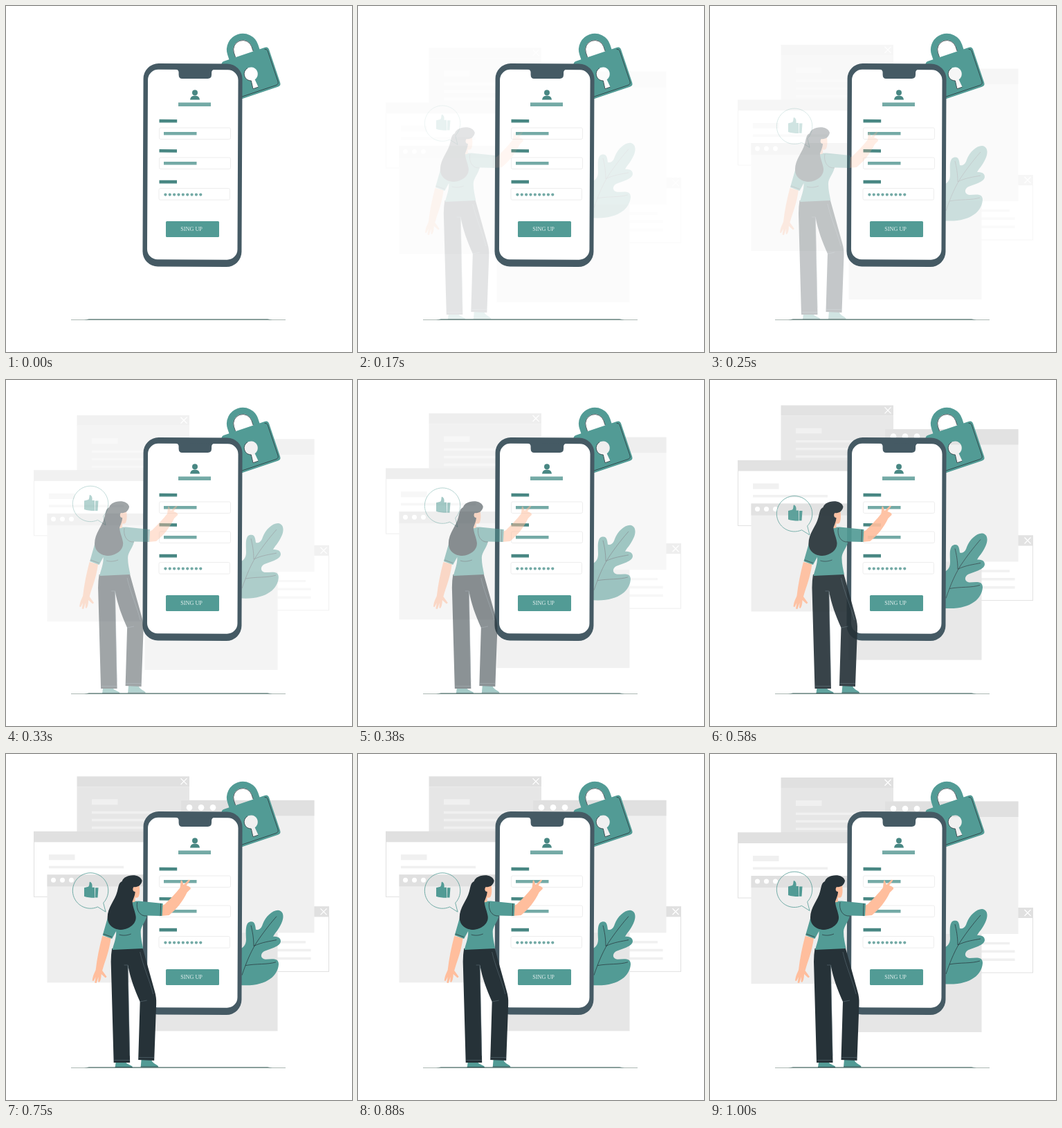
Write an HTML page that moves like this. It is 500 px wide and 500 px high and loops after 1.04 s.

```html
<!DOCTYPE html>
<html lang="en">
<head>
<meta charset="utf-8">
<title>Sign-up illustration</title>
<style>
  html, body { margin: 0; width: 100%; height: 100%; overflow: hidden; background: #fff; }
  svg { display: block; width: 100%; height: 100%; }
  .teal { fill: #529b95; }
  .deep { fill: #488783; }
  .soft { fill: #74aaa6; }
  .dark { fill: #263238; }
  .skin { fill: #ffbe9d; }
  .bar { fill: #e0e0e0; }
  .pale { fill: #f0f0f0; }
  .white { fill: #fff; }
  .frame { fill: #fff; stroke: #e0e0e0; }
  .cross { fill: none; stroke: #fff; stroke-width: 1.3; }
  .line { fill: none; stroke: #263238; stroke-width: .7; }
  .stitch { fill: none; stroke: #5b6d76; stroke-width: .6; }
  .field { fill: #fff; stroke: #ebebeb; stroke-width: .9; }
</style>
</head>
<body>
<svg viewBox="0 0 500 500">
  <g id="windows">
    <rect class="bar" x="102.5" y="34" width="162.5" height="15"/>
    <rect x="102.5" y="49" width="162.5" height="90" fill="#e6e6e6"/>
    <path class="cross" d="M252.5 36.8l9 9m0-9l-9 9"/>
    <path class="pale" d="M124 67h37.500v8H124zM124 84.500h116v3.500H124zM124 95.500h116v3.500H124zM124 106.500h116v3.500H124z"/>

    <rect class="frame" x="340" y="222.500" width="126.500" height="93.500"/>
    <rect class="bar" x="340" y="222" width="127" height="15"/>
    <path class="cross" d="M454.500 225l9 9m0-9l-9 9"/>
    <path class="pale" d="M380 272h53v3.200h-53zM380 283.500h60.500v3.500H380zM380 295.500h60.500v3.500H380z"/>

    <rect x="200.500" y="210" width="192" height="192" fill="#e6e6e6"/>
    <rect class="pale" x="253" y="68.500" width="192.500" height="191.500"/>
    <rect class="bar" x="253" y="68.500" width="192.500" height="22.500"/>
    <g class="white"><circle cx="265" cy="79" r="4.300"/><circle cx="282" cy="79" r="4.300"/><circle cx="299" cy="79" r="4.300"/></g>

    <rect class="frame" x="40.500" y="114" width="165" height="94"/>
    <rect class="bar" x="40" y="113.500" width="166" height="15.500"/>
    <path class="pale" d="M62 147h37.500v8H62zM62 163.500h108v3.500H62z"/>

    <rect x="59.500" y="176" width="150" height="156" fill="#eee"/>
    <rect class="bar" x="59.500" y="176" width="150" height="17"/>
    <g class="white"><circle cx="68.500" cy="184" r="3.500"/><circle cx="81.500" cy="184" r="3.500"/><circle cx="94.500" cy="184" r="3.500"/></g>
  </g>

  <path d="M94 453.500H404" stroke="#a3b0ac" fill="none" stroke-width=".9"/>
  <path d="M113 453.700L120 452.300H378L385 453.700Z" fill="#6f8a86"/>

  <g id="leaf">
    <path class="teal" d="M335 332V281C343 279 347 274 347 266C347 258 345 243 352 241C360 239 360 246 361 252C365 253 369 251 371 244C375 233 385 224 393 224C402 225 402 235 398 243C394 252 388 258 386 262C392 262 397 263 397 269C396 277 382 279 372 284C367 288 368 294 375 295C383 295 394 292 394 302C393 320 374 336 335 332Z"/>
    <path class="line" d="M341 318C347 300 355 280 366 265C375 252 384 241 391 233M358 276C358 264 356 254 354 246M358 276C370 270 382 269 391 267M346 304C362 301 378 303 390 299"/>
  </g>

  <g id="lock" transform="translate(354 98.200) rotate(-18.600)">
    <path d="M-18.500-26V-37A18.500 18.500 0 0 1 18.500-37V-26" fill="none" stroke="#529b95" stroke-width="9.500"/>
    <path class="line" d="M-13.500-30V-37A13.500 13.500 0 0 1 13.500-37V-30"/>
    <path class="teal" fill-rule="evenodd" d="M-31-30H31Q36-30 36-25V25Q36 30 31 30H-31Q-36 30-36 25V-25Q-36-30-31-30ZM-2.800 9.400L-4 21.300H4L2.800 9.400A9.800 9.800 0 1 0-2.800 9.400Z"/>
    <path class="line" d="M-34 27H29Q33.500 27 33.500 22.500V-24Q33.500-27 30-27.500M-4 21.300L-2.800 9.400A9.800 9.800 0 0 1-2-9.600M-4 21.300H4"/>
  </g>

  <g id="phone">
    <g transform="rotate(.25 269.500 230)">
      <rect x="198" y="83.300" width="143" height="293.500" rx="22" fill="#455a64"/>
      <rect class="white" x="204.500" y="92" width="130.500" height="274.500" rx="15"/>
      <path fill="#455a64" d="M244 91Q249 92 249 96V99Q249 105 254 105H291Q296.500 105 296.500 99V96Q296.500 92 301 91Z"/>
    </g>
    <circle class="deep" cx="273" cy="125.300" r="4"/>
    <path class="deep" d="M266 135.500Q266.500 129.500 273 129.500T280 135.500Z"/>
    <path class="soft" d="M249 139.500H296V145H249Z"/>
    <path class="deep" d="M221.500 163.800l25.700.3v4.400l-25.700-.1zM221.500 207l25.500.3v4.500l-25.500-.2zM221.500 251.800h25.500v4.700h-25.500z"/>
    <rect class="field" x="221.500" y="176" width="103" height="16.500" rx="2"/>
    <rect class="field" x="221.500" y="219" width="103" height="16.500" rx="2"/>
    <rect class="field" x="221" y="263.500" width="102.500" height="16.700" rx="2"/>
    <path class="soft" d="M228 182h47.500v4.500H228zM228 225h47.500v4.500H228z"/>
    <path d="M230.400 272.600h51.100" fill="none" stroke="#74aaa6" stroke-width="4.300" stroke-linecap="round" stroke-dasharray="0 6.360"/>
    <rect class="teal" x="231" y="311" width="77" height="23" rx="1.500"/>
    <text x="252.300" y="325" font-family="'Liberation Serif', serif" font-size="8.200" fill="#e3efee">SING UP</text>
  </g>

  <g id="bubble">
    <path fill="none" stroke="#529b95" stroke-width=".8" d="M132.500 219.300A25.700 25.700 0 1 1 140.700 213.500L144 226.500Z"/>
    <path class="teal" d="M113 191.500L119 190C121 188 120 185 121 183C124 183.500 125 187 124.500 191H128V206C122 206 117 205.500 113 204ZM129 191.500H133.500L132.500 205.800H128.600Z"/>
  </g>

  <g id="woman">
    <path class="teal" d="M157 445H171C173 449 181 449.500 181.500 453H156ZM194 441H208C210 448 218 448.500 219 452.500H193Z"/>
    <path class="line" d="M156 452.500H181M193 452H218"/>
    <path class="skin" d="M137.500 263L150 266C147 287 142 297 137.500 313L144 322L142 323.500L136 318C136 323 135 328 133 330L131.500 329L132 322L129 331L126.500 330.500L128 322L125 328L123 327.500C124 320 126 317 128 312C130 295 133 280 137.500 263Z"/>
    <path class="dark" d="M151.500 281H196L213 342Q216 352 215.500 361L212.500 443L189.500 442L192 358C184 340 178 324 174.500 305L177.500 446H154L150 300Q150 290 151.500 281Z"/>
    <path class="stitch" d="M155 442.500H177M190 438.500H212.500M169 305H174.500L175 310M192 358L202 356M192 286C196 305 207 330 211 347M174.500 306L177 436"/>
    <path class="skin" d="M224 219L228 217C235 210 244 201 250 193L251 183L252.500 182.500L255 189L262.500 181.500L264.500 182.500L259 190C263 191 266 193 265 195L260 200C254 213 244 225 234 233L223 234Z"/>
    <path class="teal" d="M177 213L190 212.500L225 216L224 234L202 233.500C200 243 193 249 193 257C193 266 195 273 196.500 281L152 283C154 274 158 266 157.500 256L151.500 267L138 262L146 234Z"/>
    <path class="line" d="M188 214C186 224 191 235 202 234M162 261C168 263 174 262 179 260M139 260L151.500 264.500M222 216L221.500 234"/>
    <path class="skin" d="M180 190L190.500 187C192 195 192 202 190 206C188.500 208.500 186 207.500 185 207.500L185 213.500L178 215Z"/>
    <path class="dark" d="M195 183C193 176 184 174 176 176C169 178 167 181 166 184C161 186 161 192 159 199C156 211 145 222 145 236C145 248 155 254 165 254C177 253 187 245 186 235C185 227 181 220 181 213C184 206 185 202 185 199C181 199 181 194 183 192C188 193 194 190 195 183Z"/>
  </g>
</svg>
<script>
const LOOP = 1040;
const FPS = 24;
const FIRST_STEP = 3;
const SLIDE = 30;

const bezier = (s, a, b) => 3 * a * s * (1 - s) ** 2 + 3 * b * s * s * (1 - s) + s ** 3;

// cubic-bezier(.36, -.01, .5, 1.38): overshoots, then settles
function ease(x) {
  if (x >= 1) return 1;
  let low = 0, high = 1;
  for (let i = 0; i < 24; i++) {
    const mid = (low + high) / 2;
    if (bezier(mid, 0.36, 0.5) < x) low = mid; else high = mid;
  }
  return bezier(low, -0.01, 1.38);
}

// Direction each part starts from
const movers = [
  ["windows", 0, 1],
  ["leaf", 0, -1],
  ["bubble", 0, -1],
  ["woman", -1, 0],
].map(([id, dx, dy]) => ({ node: document.getElementById(id), dx, dy }));

function render(ms) {
  const step = Math.floor((ms + 5) * FPS / 1000);
  const progress = step < FIRST_STEP ? 0 : ease((step + 0.5) / FPS);
  const offset = SLIDE * (1 - progress);
  for (const { node, dx, dy } of movers) {
    node.setAttribute("transform", `translate(${dx * offset} ${dy * offset})`);
    node.setAttribute("opacity", Math.min(1, progress));
  }
}

let start;
function tick(now) {
  start ??= now;
  render((now - start) % LOOP);
  requestAnimationFrame(tick);
}
render(0);
requestAnimationFrame(tick);
</script>
</body>
</html>
```
